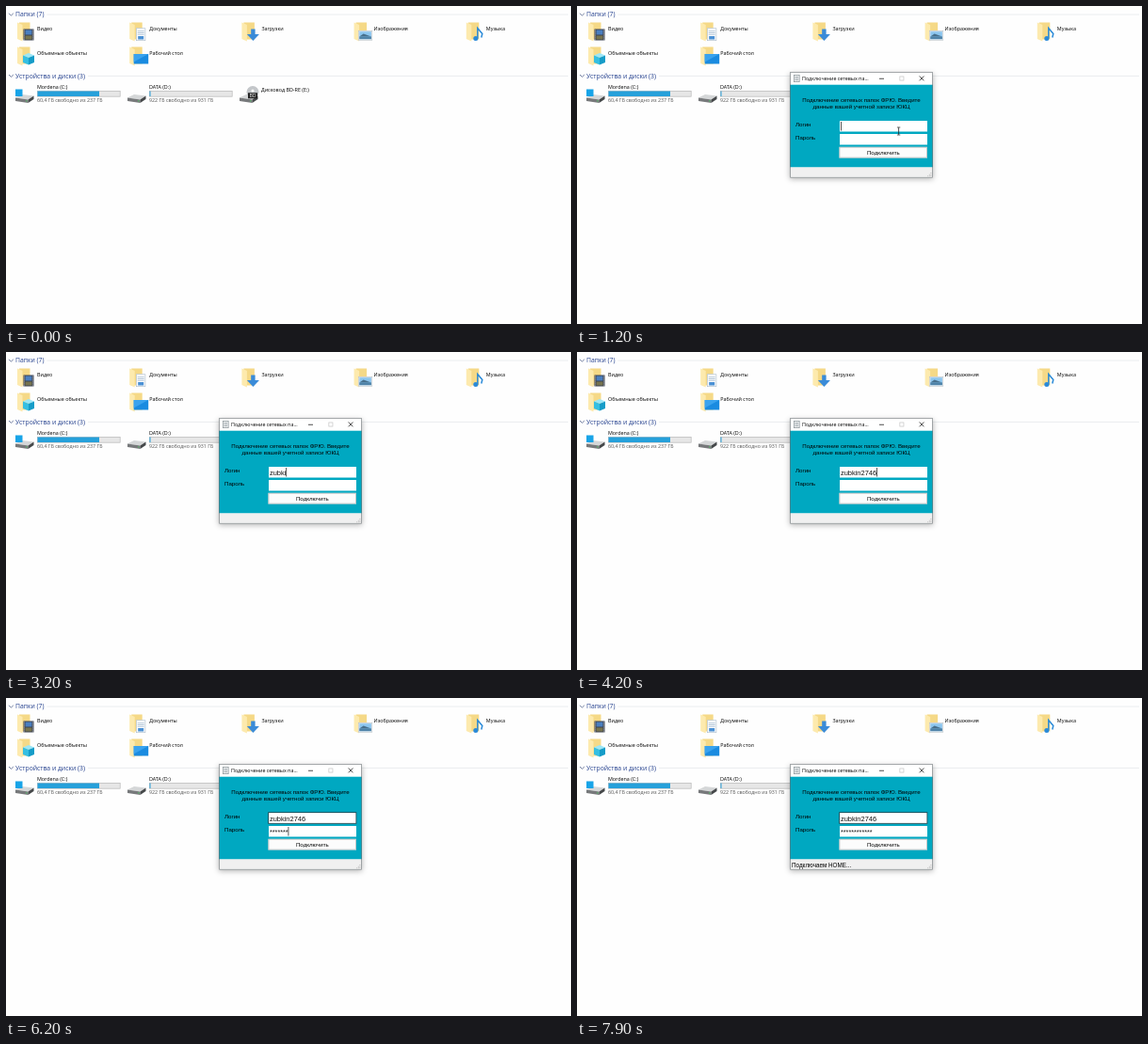
An HTML page with a canvas that plays this animation: 600x338 px, repeating every 8000 ms.

```html
<!DOCTYPE html>
<html lang="ru">
<head>
<meta charset="utf-8">
<title>Подключение сетевых папок</title>
<style>
html, body { margin: 0; width: 100%; height: 100%; overflow: hidden; background: #fefefe; }
canvas { display: block; width: 100vw; height: 100vh; }
</style>
</head>
<body>
<canvas id="stage"></canvas>
<script>
const W = 600, H = 338, LOOP = 8000;
const UI = '"Open Sans", "Noto Sans", sans-serif';
const FORM = '"Liberation Sans", Arial, sans-serif';
const LOGIN = 'zubkin2746', PASSWORD = '*'.repeat(12);

// Moments of the story, in ms
const OPEN = 800, MOVE = 1000, BLINK = 1300, TYPE_LOGIN = 2400,
  TAB = 4500, TYPE_PASSWORD = 4900, SUBMIT = 7300, STATUS = 7500;
const KEY = 187;

const canvas = document.getElementById('stage');
const c = canvas.getContext('2d');
const dpr = window.devicePixelRatio || 1;
canvas.width = W * dpr;
canvas.height = H * dpr;

function rect(x, y, w, h, color) {
  c.fillStyle = color;
  c.fillRect(x, y, w, h);
}

function frame(x, y, w, h, color, lw = 0.8) {
  c.strokeStyle = color;
  c.lineWidth = lw;
  c.strokeRect(x + lw / 2, y + lw / 2, w - lw, h - lw);
}

function trace(points) {
  c.beginPath();
  points.forEach(([x, y]) => c.lineTo(x, y));
}

function poly(color, ...points) {
  trace(points);
  c.fillStyle = color;
  c.fill();
}

function line(color, lw, ...points) {
  trace(points);
  c.strokeStyle = color;
  c.lineWidth = lw;
  c.stroke();
}

function dot(x, y, r, color) {
  c.beginPath();
  c.arc(x, y, r, 0, Math.PI * 2);
  c.fillStyle = color;
  c.fill();
}

// Box whose right edge is shifted down by drop
function slab(x, y, w, h, drop, color) {
  poly(color, [x, y], [x + w, y + drop], [x + w, y + drop + h], [x, y + h]);
}

function text(str, x, y, size, family, color = '#000', align = 'left') {
  c.font = `${size}px ${family}`;
  c.textAlign = align;
  c.fillStyle = color;
  c.fillText(str, x, y);
  return c.measureText(str).width;
}

function at(x, y, draw) {
  c.save();
  c.translate(x, y);
  draw();
  c.restore();
}

// Small signs on the folders, around their own centre
const badges = {
  video() {
    rect(-5.5, -6, 11, 12, '#3c4350');
    rect(-3.5, -5, 7, 5, '#4a7fc0');
    rect(-3.5, 1, 7, 4, '#77744f');
    for (let y = -5; y < 6; y += 2)
      for (const x of [-5, 4.2]) rect(x, y, 0.8, 0.9, '#d5d8dd');
  },
  docs() {
    rect(-5, -7, 10, 13.5, '#fcfdfe');
    frame(-5, -7, 10, 13.5, '#a9b9c9', 0.6);
    for (let y = -4; y < 1; y += 1.7) rect(-3.5, y, 7, 0.6, '#8ba6c1');
    rect(-3, 1.5, 6, 3.5, '#4a90d4');
  },
  down() {
    rect(-2.2, -6, 4.4, 6, '#3a8bd8');
    poly('#3a8bd8', [-6.5, -0.5], [6.5, -0.5], [0, 6.5]);
  },
  image() {
    rect(-7.5, -4.5, 15, 10.5, '#f7f9fb');
    frame(-7.5, -4.5, 15, 10.5, '#b5bdc4', 0.6);
    rect(-6.3, -3.3, 12.6, 8, '#8cc5ee');
    poly('#476f8c', [-6.3, 2], [-2, -1], [6.3, 2]);
    rect(-6.3, 2, 12.6, 2.7, '#4f83a8');
  },
  music() {
    line('#2a8ad8', 1.5, [0, 4], [0, -7], [5, -1], [4, 3]);
    dot(-2, 4, 2.5, '#2a8ad8');
  },
  cube() {
    poly('#9be6f7', [-6, -4], [0, -6.5], [6, -4], [0, -1.5]);
    slab(-6, -4, 6, 7.5, 2.5, '#35bfe2');
    slab(0, -1.5, 6, 7.5, -2.5, '#159cc8');
  },
  desktop() {
    rect(-7.5, -5.5, 15.5, 10.5, '#1a8be0');
    poly('#3aa3ee', [-7.5, -5.5], [8, -5.5], [-7.5, 3]);
  }
};

function folder(x, y, label, badge) {
  at(x, y, () => {
    rect(2, 1, 11.5, 18, '#f5d987');
    slab(0, 1, 5.5, 17.5, 2.5, '#fdeaae');
    at(12, 14, badges[badge]);
    text(label, 21, 9.6, 5.4, UI);
  });
}

function group(y, label) {
  line('#4a5a86', 0.8, [3, y - 1.2], [5.4, y + 1.2], [7.8, y - 1.2]);
  const w = text(label, 10, y + 2.4, 6.8, UI, '#24408e');
  rect(13 + w, y - 0.3, 584 - w, 0.7, '#e2e4e8');
}

function driveBox(x) {
  at(x, 93, () => {
    poly('#d5d7d8', [0, 4.5], [7, 1], [19.5, 2.5], [13.5, 6.5]);
    slab(0, 4.5, 13.5, 3.5, 2, '#77797b');
    slab(13.5, 6.5, 6, 3.5, -4, '#45484a');
    rect(11, 7.5, 1.5, 0.9, '#54d06a');
  });
}

function disk(x, label, free, used) {
  driveBox(x - 23);
  text(label, x, 88, 5.4, UI);
  rect(x, 90, 88.5, 6.5, '#e6e6e6');
  frame(x, 90, 88.5, 6.5, '#bcbcbc', 0.7);
  rect(x + 0.5, 90.5, used, 5.5, '#26a0da');
  text(free, x, 102, 5.35, UI, '#555');
}

function explorer() {
  rect(0, 0, W, H, '#fefefe');
  group(9, 'Папки (7)');
  [['Видео', 'video'], ['Документы', 'docs'], ['Загрузки', 'down'],
   ['Изображения', 'image'], ['Музыка', 'music'],
   ['Объемные объекты', 'cube'], ['Рабочий стол', 'desktop']
  ].forEach(([label, badge], i) =>
    folder(12 + (i % 5) * 119.2, 16.5 + Math.floor(i / 5) * 26, label, badge));

  group(74.2, 'Устройства и диски (3)');
  disk(33, 'Mordena (C:)', '60,4 ГБ свободно из 237 ГБ', 65.5);
  rect(10, 88.5, 7.5, 7.5, '#18a4e8');
  disk(152, 'DATA (D:)', '922 ГБ свободно из 931 ГБ', 1);

  driveBox(248);
  dot(262, 91.5, 6.5, '#c3c6c9');
  dot(262, 90, 1.6, '#f8f8f8');
  rect(257, 92.3, 10, 6, '#222');
  text('BD', 262, 97.2, 5.2, UI, '#f4f4f4', 'center');
  text('Дисковод BD-RE (E:)', 271, 91.4, 5.4, UI);
}

function typed(str, start, t) {
  return str.slice(0, Math.max(0, Math.floor((t - start) / KEY) + 1));
}

function field(y, str, size, active) {
  rect(279, y, 93, 11.5, '#fff');
  const w = text(str, 280, y + 8.5, size, FORM, '#111');
  if (active) rect(280 + w, y + 1, 0.7, 9.5, '#111');
}

function titleBar() {
  rect(230, 73, 6.5, 8, '#eceeef');
  frame(230, 73, 6.5, 8, '#8b9499', 0.7);
  for (let y = 75; y < 80; y += 1.7) rect(231.5, y, 3.5, 0.7, '#9aa3a8');
  text('Подключение сетевых па...', 239, 79, 5.35, UI);
  rect(321, 76.8, 5, 0.8, '#222');
  frame(342.5, 74.6, 4.8, 4.8, '#c4c4c4', 0.7);
  for (const s of [-2.4, 2.4])
    line('#222', 0.8, [366 - s, 74.5], [366 + s, 79.3]);
}

function dialog(t) {
  c.save();
  c.shadowColor = 'rgba(0,0,0,0.3)';
  c.shadowBlur = 6 * dpr;
  c.shadowOffsetY = 1.5 * dpr;
  rect(226.3, 70.2, 151.4, 112.4, '#fff');
  c.restore();
  rect(226.3, 83.7, 151.4, 87.8, '#00a8c1');
  rect(226.3, 171.5, 151.4, 11, '#f0f0f0');
  frame(226.3, 70.2, 151.4, 112.4, 'rgba(60,70,75,0.65)', 0.7);
  titleBar();

  text('Подключение сетевых папок ФРЮ. Введите', 302, 102.2, 6.15, FORM, '#000', 'center');
  text('данные вашей учетной записи ЮКЦ', 302, 108.8, 6.15, FORM, '#000', 'center');
  text('Логин', 232, 128.2, 6.15, FORM);
  text('Пароль', 232, 142.3, 6.1, FORM);

  const blinkOn = t < BLINK || t >= TYPE_LOGIN;
  field(122, typed(LOGIN, TYPE_LOGIN, t), 7.45, blinkOn && t < TAB);
  field(136, typed(PASSWORD, TYPE_PASSWORD, t), 7.2, t >= TAB && t < SUBMIT);
  if (t >= TAB) frame(278.3, 121.3, 94, 12.4, '#1d3c44');

  rect(278.5, 149.8, 93.5, 11.7, '#fcfcfc');
  frame(278.5, 149.8, 93.5, 11.7, '#b9bcbc');
  text('Подключить', 325.3, 157.8, 6.15, FORM, '#000', 'center');

  if (t >= STATUS) text('Подключаем HOME...', 228, 179.6, 6.3, FORM);
  for (let i = 0; i < 3; i++)
    for (let j = 0; j <= i; j++) rect(375.5 - j * 1.6, 177.2 + i * 1.6, 0.8, 0.8, '#a8a8a8');
}

// Text pointer gliding into the login field, hidden once typing starts
function pointer(t) {
  if (t < MOVE || t >= TYPE_LOGIN) return;
  const rest = (1 - Math.min(1, (t - MOVE) / 500)) ** 2;
  at(327.3 + 40 * rest, 128 + 14 * rest, () => {
    line('#222', 0.8, [0, -3.8], [0, 3.8]);
    for (const y of [-4, 4]) line('#222', 0.7, [-1.7, y], [1.7, y]);
  });
}

function draw(now) {
  const t = now % LOOP;
  c.setTransform(dpr, 0, 0, dpr, 0, 0);
  explorer();
  if (t >= OPEN) {
    dialog(t);
    pointer(t);
  }
  requestAnimationFrame(draw);
}

requestAnimationFrame(draw);
</script>
</body>
</html>
```
